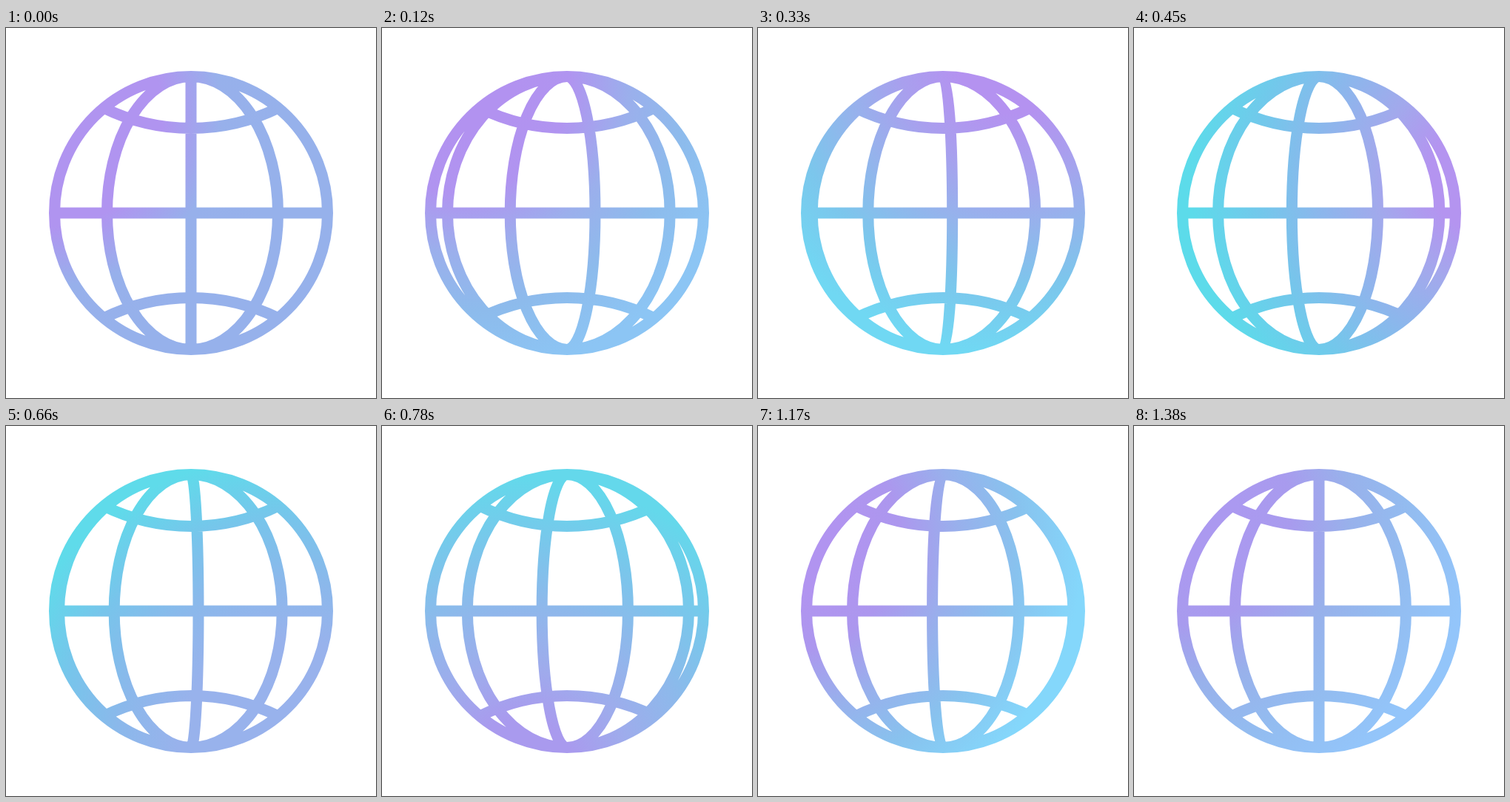
An HTML page with a canvas that plays this animation: 500x500 px, repeating every 3.41 s.

```html
<!DOCTYPE html>
<html lang="en">
<head>
<meta charset="utf-8">
<title>Spinning globe</title>
<style>
  html, body { margin: 0; width: 100%; height: 100%; overflow: hidden; background: #fff; }
  canvas { display: block; width: 500px; height: 500px; }
</style>
</head>
<body>
<canvas id="stage" width="500" height="500"></canvas>
<script>
const ctx = document.getElementById('stage').getContext('2d');
const LOOP = 3410, STEP = 30, SPIN_END = 1380;
const C = 250, R = 184.5, LINE = 15;

// Half-widths of the meridians at rest; each one glides to its right neighbour.
const SLOTS = [-R, -113.5, 0, 117.5, R];

// Key poses: time, meridian travel in slots, direction of the gradient centre.
const TIMES = [0, 210, 450, 660, 930, 1170, SPIN_END];
const TRAVEL = [0, 0.64, 1.677, 3.085, 4.305, 4.873, 5];
const ANGLES = [-145, -112, -12, 55, 163, 205, 215];
const TINTS = [
  'b094f0 b094f0 97b0eb 96b1eb 96b1eb',
  'b490f0 b094f0 9eafec 86c3ec 84d4fb',
  'b494f0 a2a9ec 8bb7ec 72c8eb 5cdbea',
  '98b2ec 98b2ec 8bb8eb 78c4eb 5fdbea',
  'be7df0 a6a5ec 92b9ec 7cc8ec 6ad4ec',
  'b194f0 ac97ee 98b0ec 88c2ee 84d7fb',
  'ab99f0 a89bee 98b1eb 93bcf0 93c5fa'
].map(row => row.split(' ').map(toRgb));

// Distances of the colour stops from the gradient centre.
const STOPS = [75, 150, 230, 310, 400];
const ORBIT = 230;

function toRgb(hex) {
  const n = parseInt(hex, 16);
  return [n >> 16, n >> 8 & 255, n & 255];
}

const lerp = (a, b, u) => a + (b - a) * u;

function segment(t) {
  let i = 0;
  while (i < TIMES.length - 2 && t >= TIMES[i + 1]) i++;
  return [i, (t - TIMES[i]) / (TIMES[i + 1] - TIMES[i])];
}

function slope(v, i) {
  const last = v.length - 1;
  if (i === last) return 0;
  const rate = j => (v[j + 1] - v[j]) / (TIMES[j + 1] - TIMES[j]);
  if (i === 0) return rate(0) * 0.6;
  const a = rate(i - 1), b = rate(i);
  return 2 * a * b / (a + b);
}

// Smooth, never-reversing curve through the key values.
function curve(v, i, u) {
  const h = TIMES[i + 1] - TIMES[i], w = 1 - u;
  return v[i] * w * w * (1 + 2 * u) + v[i + 1] * u * u * (3 - 2 * u)
    + h * u * w * (w * slope(v, i) - u * slope(v, i + 1));
}

function tint(i, u) {
  const a = curve(ANGLES, i, u) * Math.PI / 180;
  const x = C + ORBIT * Math.cos(a), y = C + ORBIT * Math.sin(a);
  const near = STOPS[0], far = STOPS[STOPS.length - 1];
  const g = ctx.createRadialGradient(x, y, near, x, y, far);
  STOPS.forEach((d, s) => {
    const rgb = TINTS[i][s].map((c, n) => Math.round(lerp(c, TINTS[i + 1][s][n], u)));
    g.addColorStop((d - near) / (far - near), `rgb(${rgb})`);
  });
  return g;
}

function meridian(w) {
  ctx.moveTo(C, C - R);
  ctx.ellipse(C, C, Math.abs(w), R, 0, -Math.PI / 2, Math.PI / 2, w < 0);
}

function parallel(side) {
  const half = 118, sag = 27.5;
  const r = (half * half + sag * sag) / (2 * sag);
  const y = C + side * (114.5 + r);
  const mid = -side * Math.PI / 2, spread = Math.asin(half / r);
  ctx.moveTo(C + r * Math.cos(mid - spread), y + r * Math.sin(mid - spread));
  ctx.arc(C, y, r, mid - spread, mid + spread);
}

function draw(now) {
  const t = Math.min(Math.floor(now % LOOP / STEP) * STEP, SPIN_END);
  const [i, u] = segment(t);
  const shift = curve(TRAVEL, i, u) % 1;

  ctx.fillStyle = '#fff';
  ctx.fillRect(0, 0, 500, 500);
  ctx.beginPath();
  ctx.arc(C, C, R, 0, Math.PI * 2);
  ctx.moveTo(C - R, C);
  ctx.lineTo(C + R, C);
  parallel(-1);
  parallel(1);
  for (let s = 0; s < SLOTS.length - 1; s++) {
    meridian(lerp(SLOTS[s], SLOTS[s + 1], shift));
  }
  ctx.lineWidth = LINE;
  ctx.lineJoin = 'round';
  ctx.strokeStyle = tint(i, u);
  ctx.stroke();
}

const start = performance.now();
function tick() {
  draw(performance.now() - start);
  requestAnimationFrame(tick);
}
tick();
</script>
</body>
</html>
```
